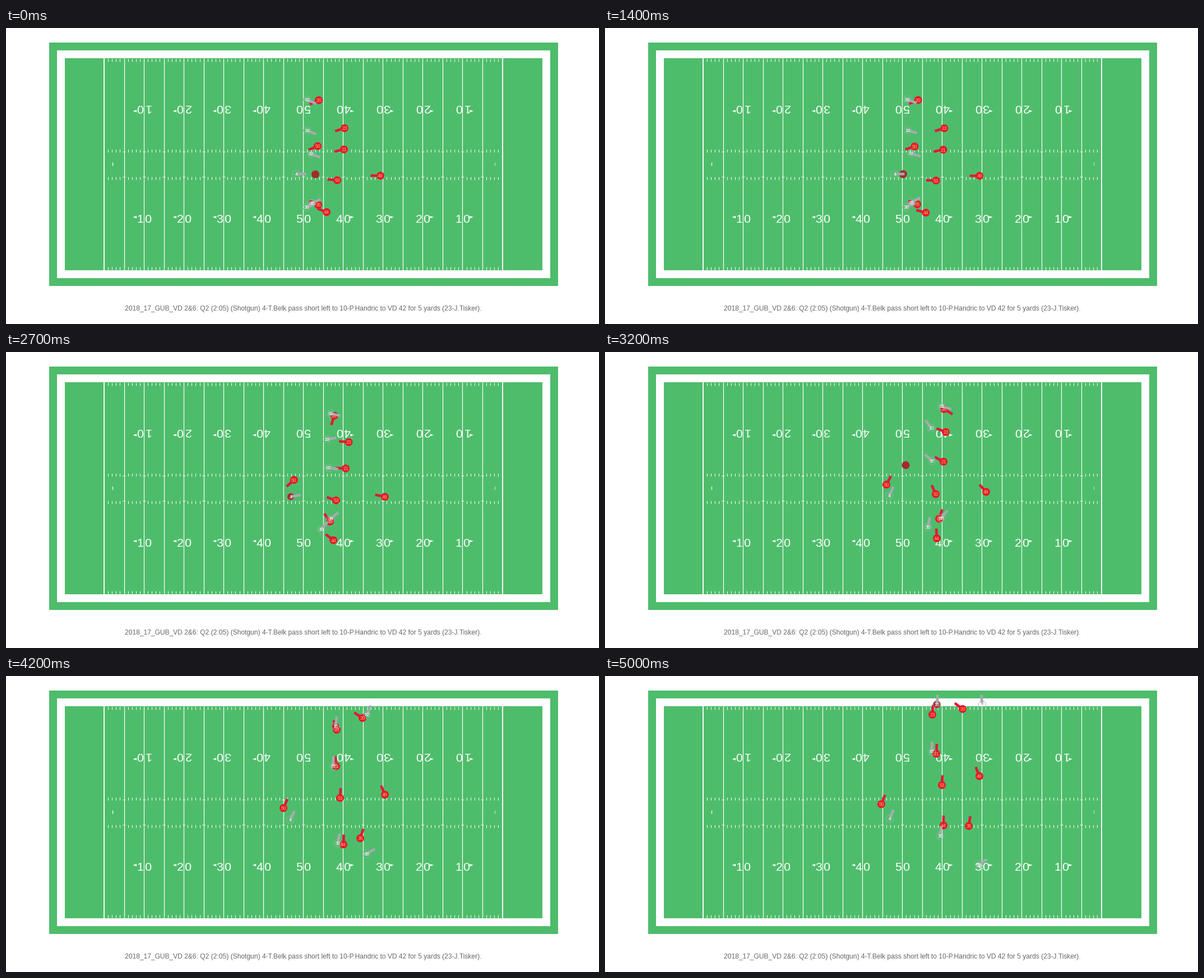
A matplotlib script for the animation above (5.1 s loop, 1058 px wide and 529 px high).

```python
import numpy as np
import matplotlib.pyplot as plt
from matplotlib.animation import FuncAnimation
from matplotlib.patches import Circle, Polygon, Rectangle

W, H, DPI = 1058, 529, 100
FRAMES, INTERVAL = 51, 100
PT = 72 / DPI  # points per pixel
GREEN, RED, GOLD = "#4EBD6B", "#E31837", "#FFB81C"
GREY, BROWN = "#A5ACAF", "#A52A2A"
GOAL_X, YARD = 175, 7.105
TOP, BOTTOM = 54, 433
BAR = 17.6
SNAP, IN_HAND, THROW, CATCH = 10, 17, 28, 39
T = np.arange(FRAMES)
ROUTE_TIMES = np.array([SNAP + 1, 22, 32, 42, FRAMES - 1], float)

plt.rcParams["font.family"] = "Liberation Sans"
fig = plt.figure(figsize=(W / DPI, H / DPI), dpi=DPI, facecolor="white")
ax = fig.add_axes([0, 0, 1, 1])
ax.set_xlim(0, W)
ax.set_ylim(H, 0)
ax.axis("off")


def box(x0, y0, x1, y1, color):
    ax.add_patch(Rectangle((x0, y0), x1 - x0, y1 - y0, fc=color, lw=0))


def line(x0, y0, x1, y1, width=1.0):
    ax.plot([x0, x1], [y0, y1], color="white", lw=width * PT,
            solid_capstyle="butt", zorder=1.5)


def label(x, y, text, size, color, **kw):
    return ax.text(x, y, text, fontsize=size * PT, color=color, ha="center",
                   va="baseline", rotation_mode="anchor", **kw)


def draw_field():
    box(77, 26, 985, 461, GREEN)
    box(91, 40, 971, 447, "white")
    box(105, TOP, 957, BOTTOM, GREEN)
    for yard in range(101):
        x = GOAL_X + YARD * yard
        if yard % 100 == 0:
            line(x, TOP, x, BOTTOM, 1.9)
        elif yard % 5 == 0:
            line(x, TOP, x, BOTTOM, 1.2)
            for y in (220.5, 265.5):
                line(x - 2.5, y, x + 2.5, y)
        else:
            for y in (55, 216.5, 265.5, 426.5):
                line(x, y, x, y + 5)
    for yard, width in ((2, 1.2), (98, 0.7)):
        x = GOAL_X + YARD * yard + 0.5
        line(x, 240, x, 246, width)


def draw_numbers():
    for i in range(1, 10):
        x = GOAL_X + YARD * 10 * i
        tens = str(min(i, 10 - i))
        for dx, digit in ((-6.7, tens), (6.7, "0")):
            label(x + dx, 348.3, digit, 21.5, "white", zorder=2)
            label(x - dx, 137.2, digit, 21.5, "white", rotation=180, zorder=2)
        side = np.sign(i - 5)
        if side:
            base = x + side * 13
            for y in (338, 148.5):
                ax.add_patch(Polygon([(base, y - 2.2), (base, y + 2.2),
                                      (base + side * 6.5, y)],
                                     fc="white", lw=0, zorder=2))


def ramp(start, end):
    return np.clip((T - start) / (end - start), 0, 1)[:, None]


def route(points):
    """Hermite curve through the waypoints, standing still until the snap."""
    p = np.array(points, float)
    slope = np.gradient(p, ROUTE_TIMES, axis=0)
    slope[0] = 0
    t = np.maximum(T, ROUTE_TIMES[0])
    k = np.clip(np.searchsorted(ROUTE_TIMES, t, side="right") - 1, 0, len(p) - 2)
    h = np.diff(ROUTE_TIMES)[k][:, None]
    s = (t - ROUTE_TIMES[k])[:, None] / h
    return ((1 + 2 * s) * (1 - s) ** 2 * p[k] + s * (1 - s) ** 2 * h * slope[k]
            + s * s * (3 - 2 * s) * p[k + 1] + s * s * (s - 1) * h * slope[k + 1])


def ball_path(passer, receiver):
    """Snapped to the passer, thrown in a straight line, carried by the receiver."""
    spot = np.array([552, 261.5])
    held = spot + (passer - spot) * ramp(SNAP, IN_HAND)
    flight = passer[THROW] + (receiver[CATCH] - passer[THROW]) * ramp(THROW, CATCH)
    when = T[:, None]
    return np.where(when < THROW, held, np.where(when < CATCH, flight, receiver))


def facing(path, ball, forward):
    """Look across the line at first, later between the ball and the way ahead."""
    to_ball = ball - path
    to_ball /= np.linalg.norm(to_ball, axis=1, keepdims=True) + 8
    look = to_ball + 0.24 * np.gradient(path, axis=0)
    look += 2 * (1 - ramp(20, 30)) * np.array([forward, 0])
    return look / (np.linalg.norm(look, axis=1, keepdims=True) + 1e-9)


class Player:
    def __init__(self, number, path, ball, defense):
        color = RED if defense else GREY
        z = 4 if defense else 7
        self.path = path
        self.tip = path + BAR * facing(path, ball, -1 if defense else 1)
        self.bar, = ax.plot([], [], color=color, lw=4.6 * PT,
                            solid_capstyle="butt", zorder=z)
        self.dot = Circle((0, 0), 7 if defense else 6.5, ec=color,
                          fc=color if defense else "none",
                          lw=0 if defense else 0.8 * PT, zorder=z + 1)
        ax.add_patch(self.dot)
        self.text = label(0, 0, str(number), 8.7,
                          GOLD if defense else "white", zorder=z + 2)

    def place(self, i):
        x, y = self.path[i]
        self.bar.set_data(*zip(self.path[i], self.tip[i]))
        self.dot.center = x, y
        self.text.set_position((x, y + 3.2))


# Waypoints at ROUTE_TIMES.
offense = {
    82: route([(537, 128), (560, 121), (601, 97), (644, 69), (673, 51)]),
    10: route([(537, 183), (560, 172), (582, 136), (588, 90), (592, 51)]),
    87: route([(544, 225), (564, 216), (584, 195), (584, 161), (583, 135)]),
    4: route([(518, 261), (510, 260), (507, 257), (507, 257), (508, 255)]),
    88: route([(545, 313), (562, 303), (600, 297), (643, 318), (667, 338)]),
    30: route([(536, 320), (549, 319), (576, 313), (592, 299), (598, 286)]),
}
defense = {
    20: route([(558, 129), (569, 123), (605, 102), (636, 75), (638, 59)]),
    23: route([(604, 179), (612, 174), (608, 143), (590, 96), (584, 69)]),
    50: route([(556, 211), (528, 219), (502, 237), (495, 236), (493, 229)]),
    21: route([(603, 217), (606, 216), (604, 196), (589, 161), (591, 139)]),
    53: route([(591, 272), (589, 272), (590, 254), (596, 218), (601, 195)]),
    49: route([(668, 264), (671, 263), (680, 250), (676, 212), (668, 179)]),
    35: route([(557, 316), (564, 308), (596, 298), (632, 290), (649, 268)]),
    44: route([(572, 329), (577, 335), (592, 333), (602, 301), (604, 267)]),
}

draw_field()
draw_numbers()
label(530.5, 505, "2018_17_GUB_VD 2&6: Q2 (2:05) (Shotgun) 4-T.Belk pass short left "
      "to 10-P.Handric to VD 42 for 5 yards (23-J.Tisker).", 12, "#666666")

ball_xy = ball_path(offense[4], offense[10])
players = [Player(number, path, ball_xy, team is defense)
           for team in (offense, defense) for number, path in team.items()]
ball = Circle((0, 0), 7, fc=BROWN, lw=0, zorder=3)
ax.add_patch(ball)


def update(i):
    ball.center = ball_xy[i]
    for player in players:
        player.place(i)
    return []


anim = FuncAnimation(fig, update, frames=FRAMES, interval=INTERVAL,
                     repeat=True, repeat_delay=0, blit=False)
plt.show()
```
